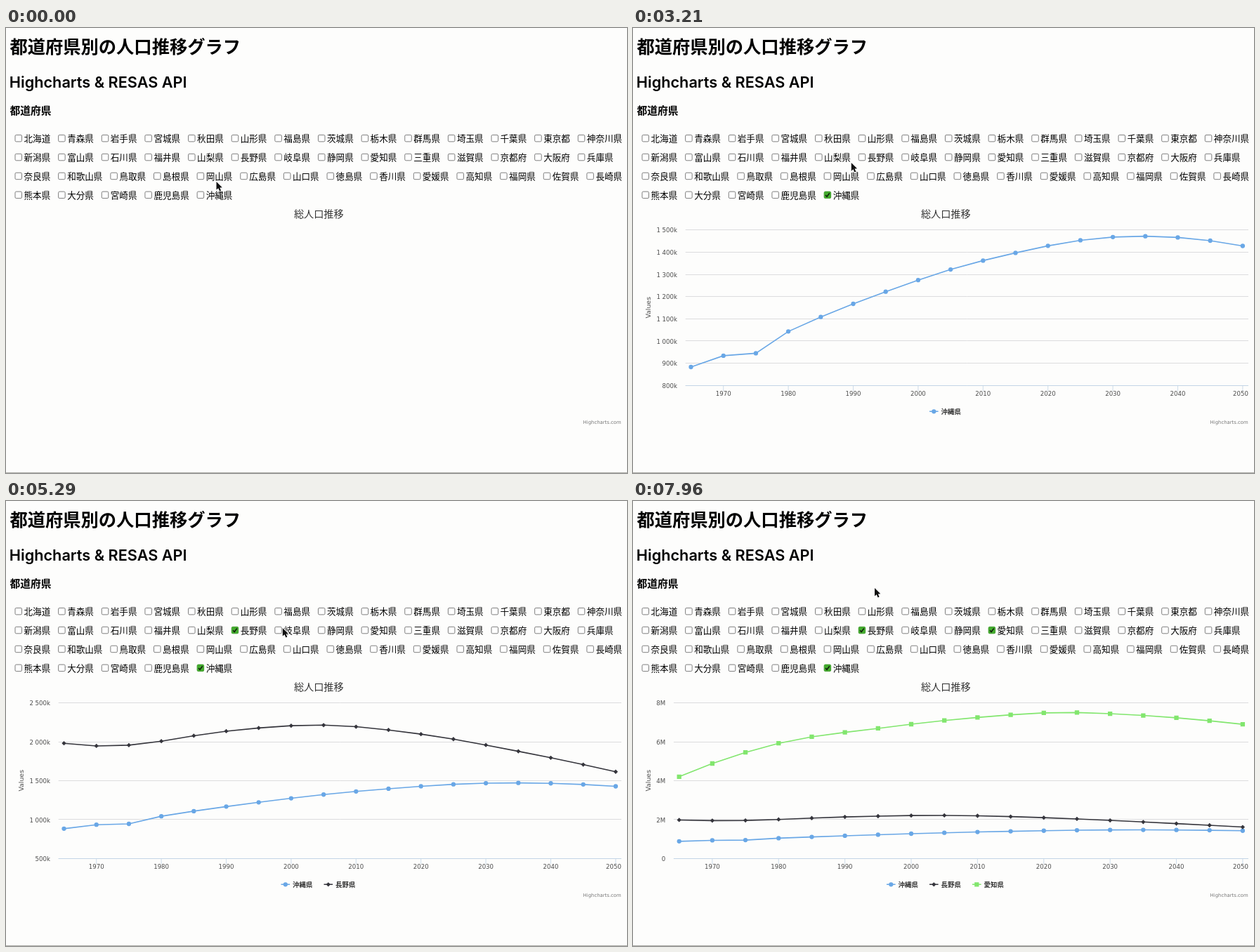
An HTML page with a canvas that plays this animation: 884 by 634 pixels, repeating every 8 s.

```html
<!DOCTYPE html>
<html lang="ja">
<head>
<meta charset="utf-8">
<title>都道府県別の人口推移グラフ</title>
<style>
  html, body { margin: 0; width: 100%; height: 100%; overflow: hidden; background: #fdfdfc; }
  canvas { display: block; }
</style>
</head>
<body>
<canvas id="stage" width="884" height="634"></canvas>
<script>
const ctx = document.getElementById('stage').getContext('2d');
const LOOP = 8000;
const JP = '"Noto Sans CJK JP", "Noto Sans CJK", sans-serif';
const LATIN = '"DejaVu Sans", sans-serif';
const TOP = 287.7, HEIGHT = 221.6, BOTTOM = TOP + HEIGHT, RIGHT = 876;
const LAST = 17; // index of 2050, counting five-year steps from 1965

const prefectures = [
  '北海道 青森県 岩手県 宮城県 秋田県 山形県 福島県 茨城県 栃木県 群馬県 埼玉県 千葉県 東京都 神奈川県',
  '新潟県 富山県 石川県 福井県 山梨県 長野県 岐阜県 静岡県 愛知県 三重県 滋賀県 京都府 大阪府 兵庫県',
  '奈良県 和歌山県 鳥取県 島根県 岡山県 広島県 山口県 徳島県 香川県 愛媛県 高知県 福岡県 佐賀県 長崎県',
  '熊本県 大分県 宮崎県 鹿児島県 沖縄県'
];
const CHAR = 12.58;
const boxes = prefectures.flatMap((row, r) => {
  let x = 17.7;
  return row.split(' ').map(name => {
    const box = { name, x, y: 157.2 + r * 26.9 };
    x += 23.9 + name.length * CHAR;
    return box;
  });
});
const boxOf = name => boxes.find(b => b.name === name);

const lerp = (a, b, p) => a + (b - a) * p;
const ease = u => (1 - Math.cos(Math.PI * Math.max(0, Math.min(1, u)))) / 2;

// Smooth curve through [index, value] keys, using Hermite pieces.
function curve(keys) {
  const slope = (a, b) => (keys[b][1] - keys[a][1]) / (keys[b][0] - keys[a][0]);
  const end = keys.length - 1;
  const inner = i => slope(i - 1, i + 1);
  const tangent = i => i === 0 ? 2 * slope(0, 1) - inner(1)
    : i === end ? 2 * slope(end - 1, end) - inner(end - 1) : inner(i);
  return x => {
    const i = Math.max(1, keys.findIndex(k => k[0] >= x));
    const [x0, y0] = keys[i - 1], [x1, y1] = keys[i];
    const h = x1 - x0, u = (x - x0) / h, w = 1 - u;
    return lerp(y0, y1, u * u * (3 - 2 * u)) + h * u * w * (w * tangent(i - 1) - u * tangent(i));
  };
}

// Population in thousands; each series appears with a new axis scale.
const stages = [
  { name: '沖縄県', color: '#69a7e6', mark: 'circle', start: 980, min: 800, max: 1500, step: 100, left: 74.7,
    value: curve([[0, 883], [1, 934], [2, 945], [3, 1043], [6, 1222], [9, 1362], [13, 1468], [LAST, 1428]]) },
  { name: '長野県', color: '#35353c', mark: 'diamond', start: 4206, min: 500, max: 2500, step: 500, left: 74.7,
    value: curve([[0, 1981], [2, 1957], [5, 2137], [8, 2215], [11, 2099], [14, 1878], [LAST, 1615]]) },
  { name: '愛知県', color: '#82e66e', mark: 'square', start: 6847, min: 0, max: 8000, step: 2000, left: 57.9,
    value: curve([[0, 4206], [3, 5924], [6, 6691], [9, 7255], [12, 7505], [LAST, 6901]]) }
];
const SHOW_DELAY = 44;

// Pointer moves: begin and end time, destination.
const home = { x: 299.5, y: 219 };
const moves = [
  { from: 150, to: 700, x: 276, y: 236 },
  { from: 1300, to: 1800, x: 274.5, y: 217 },
  { from: 2700, to: 3500, x: 325.5, y: 182 },
  { from: 4300, to: 4540, x: 334, y: 180 },
  { from: 4900, to: 5900, x: 514, y: 183 },
  { from: 7250, to: 7850, x: 344, y: 124 }
];

const yOf = (v, s) => TOP + (s.max - v) / (s.max - s.min) * HEIGHT;
const xOf = (i, left) => lerp(left + 7.8, 867.9, i / LAST);
const legendX = n => 444.5 - (n * 61 - 16) / 2;

function text(str, x, y, font, color = '#000', align = 'left') {
  ctx.font = font;
  ctx.fillStyle = color;
  ctx.textAlign = align;
  ctx.fillText(str, x, y);
}

function trace(points) {
  ctx.beginPath();
  points.forEach(([x, y]) => ctx.lineTo(x, y));
}

function stroke(color, width) {
  ctx.strokeStyle = color;
  ctx.lineWidth = width;
  ctx.stroke();
}

function line(x1, y1, x2, y2, color, width = 1) {
  trace([[x1, y1], [x2, y2]]);
  stroke(color, width);
}

function drawBox({ name, x, y }, checked) {
  ctx.beginPath();
  ctx.roundRect(x - 4.7, y - 4.8, 9.5, 9.5, 1.6);
  ctx.fillStyle = checked ? '#43ac2d' : '#fff';
  ctx.fill();
  stroke(checked ? '#3b9a28' : '#707070', 0.9);
  if (checked) {
    trace([[x - 2.8, y + 0.2], [x - 0.8, y + 2.3], [x + 2.9, y - 2.6]]);
    stroke('#10200c', 1.6);
  }
  text(name, x + 7.8, y + 4.9, `${CHAR}px ${JP}`);
}

function drawMark(shape, x, y, color) {
  const r = 3.15;
  ctx.fillStyle = color;
  ctx.beginPath();
  if (shape === 'circle') ctx.arc(x, y, r, 0, 7);
  else if (shape === 'square') ctx.rect(x - r, y - r, 2 * r, 2 * r);
  else trace([[x, y - r], [x + r, y], [x, y + r], [x - r, y]]);
  ctx.fill();
}

function ticksOf(s) {
  const ticks = [];
  for (let v = s.min; v <= s.max; v += s.step) ticks.push(v);
  return ticks;
}

function tickLabel(v, s) {
  if (v === 0) return '0';
  if (s.step >= 1000) return v / 1000 + 'M';
  return (v >= 1000 ? Math.floor(v / 1000) + ' ' + String(v % 1000).padStart(3, '0') : v) + 'k';
}

function drawTick(label, y, gridY, left, gridLeft, alpha) {
  ctx.globalAlpha = alpha;
  const crispY = Math.floor(gridY) + 0.5;
  line(gridLeft, crispY, RIGHT, crispY, '#dcdcde');
  text(label, left - 11.7, y + 3.7, `8.6px ${LATIN}`, '#4c4c4c', 'right');
  ctx.globalAlpha = 1;
}

function drawAxes(s, prev, p, left) {
  const ticks = ticksOf(s), oldTicks = ticksOf(prev);
  const moving = v => lerp(yOf(v, prev), yOf(v, s), p);
  for (const v of oldTicks) {
    if (!ticks.includes(v)) drawTick(tickLabel(v, prev), moving(v), moving(v), left, left, 1 - p);
  }
  // New labels slide in while their grid lines stay put.
  for (const v of ticks) {
    const y = moving(v);
    if (oldTicks.includes(v)) drawTick(tickLabel(v, s), y, y, left, left, 1);
    else drawTick(tickLabel(v, s), y, yOf(v, s), left, s.left, p);
  }
  const axisY = Math.floor(BOTTOM) + 0.5;
  line(left, axisY, RIGHT, axisY, '#c3d5e6');
  for (let year = 1970; year <= 2050; year += 10) {
    const x = xOf((year - 1965) / 5, left);
    line(x, axisY, x, axisY + 7.8, '#c3d5e6', 0.8);
    text(year, Math.min(x, 865), 524.2, `8.6px ${LATIN}`, '#4c4c4c', 'center');
  }
  ctx.save();
  ctx.translate(25.3, 398.3);
  ctx.rotate(-Math.PI / 2);
  text('Values', 0, 0, `9.4px ${LATIN}`, '#4c4c4c', 'center');
  ctx.restore();
}

function drawSeries({ value, color, mark }, scale, shift, reveal) {
  const points = Array.from({ length: LAST + 1 }, (_, i) => [xOf(i, scale.left) + shift, yOf(value(i), scale)]);
  ctx.save();
  if (reveal < 1) {
    ctx.beginPath();
    ctx.rect(scale.left, TOP - 10, (RIGHT - scale.left) * reveal, HEIGHT + 20);
    ctx.clip();
  }
  trace(points);
  stroke(color, 1.6);
  points.forEach(([x, y]) => drawMark(mark, x, y, color));
  ctx.restore();
}

function drawLegend({ name, color, mark }, x) {
  const y = 546.3;
  line(x, y, x + 12.6, y, color, 1.6);
  drawMark(mark, x + 6.3, y, color);
  text(name, x + 16.6, 549.6, `bold 9.43px ${JP}`, '#333');
}

function drawChart(t, shown) {
  ctx.save();
  ctx.beginPath();
  ctx.rect(0, 250.5, 884, 320);
  ctx.clip();
  const count = shown.length;
  if (count) {
    const s = shown[count - 1], prev = shown[count - 2] || s;
    const p = ease((t - s.start) / 500);
    const left = lerp(prev.left, s.left, p);
    const legendLeft = lerp(legendX(Math.max(1, count - 1)), legendX(count), p);
    drawAxes(s, prev, p, left);
    shown.forEach((one, i) => {
      drawSeries(one, s, one === s ? 0 : left - s.left, ease((t - one.start) / 1000));
      drawLegend(one, legendLeft + i * 61);
    });
  }
  text('総人口推移', 445.3, 270, `14.15px ${JP}`, '#333', 'center');
  text('Highcharts.com', 875.8, 564, `6.9px ${LATIN}`, '#777', 'right');
  ctx.restore();
}

function pointerAt(t) {
  return moves.reduce((at, m) => {
    const p = ease((t - m.from) / (m.to - m.from));
    return { x: lerp(at.x, m.x, p), y: lerp(at.y, m.y, p) };
  }, home);
}

function drawPointer(t) {
  const { x, y } = pointerAt(t);
  const overText = boxes.some(b =>
    x >= b.x + 7 && x <= b.x + 7.8 + b.name.length * CHAR && Math.abs(y - b.y) < 7.5);
  ctx.save();
  ctx.translate(x, y);
  if (overText) {
    ctx.beginPath();
    for (const side of [-2.5, 2.5]) {
      ctx.moveTo(side, -6);
      ctx.quadraticCurveTo(0, -6, 0, -4);
      ctx.lineTo(0, 4);
      ctx.quadraticCurveTo(0, 6, side, 6);
    }
    stroke('#fff', 2.2);
    stroke('#222', 1);
  } else {
    trace([[0, 0], [0, 11.6], [2.7, 9.2], [4.6, 13.4], [6.6, 12.5], [4.8, 8.4], [8.3, 8.2]]);
    ctx.closePath();
    stroke('#fff', 1.8);
    ctx.fillStyle = '#111';
    ctx.fill();
  }
  ctx.restore();
}

function draw(t) {
  const shown = stages.filter(s => t >= s.start + SHOW_DELAY);
  const checked = shown.map(s => boxOf(s.name));
  ctx.fillStyle = '#fdfdfc';
  ctx.fillRect(0, 0, 884, 634);
  ctx.fillStyle = '#aeaea8';
  ctx.fillRect(0, 633, 884, 1);
  text('都道府県別の人口推移グラフ', 5.5, 36.4, `bold 25.28px ${JP}`);
  text('Highcharts & RESAS API', 4.8, 84.6, '600 21.7px Inter, sans-serif');
  text('都道府県', 5.5, 123.3, `bold 14.75px ${JP}`);
  boxes.forEach(box => drawBox(box, checked.includes(box)));
  drawChart(t, shown);
  drawPointer(t);
}

const begin = performance.now();
function frame() {
  draw((performance.now() - begin) % LOOP);
  requestAnimationFrame(frame);
}
frame();
</script>
</body>
</html>
```
